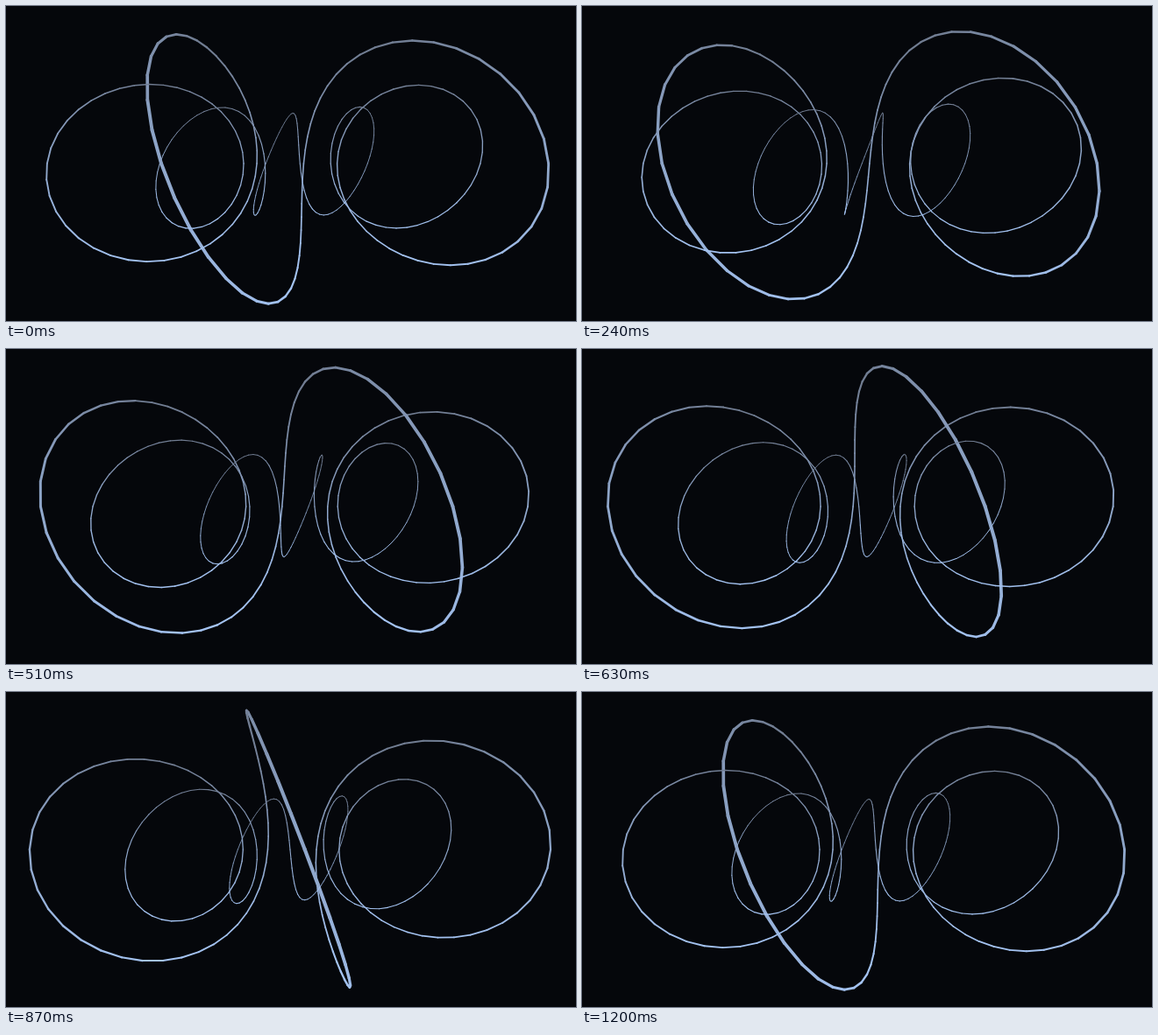
Recreate the animation shown at these times as an HTML page with a canvas. Size 650 by 360 pixels, loop 1230 ms.

```html
<!DOCTYPE html>
<html lang="en">
<head>
<meta charset="utf-8">
<title>Rotating toroidal coil</title>
<style>
  html, body { margin: 0; width: 100%; height: 100%; overflow: hidden; background: #05070b; }
  canvas { display: block; }
</style>
</head>
<body>
<canvas id="stage" width="650" height="360"></canvas>
<script>
const ctx = document.getElementById('stage').getContext('2d');
const WIDTH = 650, HEIGHT = 360;
const LOOP = 1230, STEP = 30, STEPS = 40;
const TURNS = 7, SEGMENTS = TURNS * 40;
const TUBE = 0.6;         // tube radius, relative to a ring radius of 1
const CAMERA = 2.31, FOCAL = HEIGHT / 2 / Math.tan(Math.PI / 6), LINE = 3;
const TOP = [112, 124, 145], BOTTOM = [164, 195, 241];

// Point on the coil at ring angle u, after turning the ring by spin.
function project(u, spin) {
  const ring = 1 + TUBE * Math.cos(TURNS * u);
  const height = Math.sin(TURNS * u);
  const depth = CAMERA - ring * Math.sin(u + spin);
  const scale = FOCAL / depth;
  return {
    x: WIDTH / 2 + ring * Math.cos(u + spin) * scale,
    y: HEIGHT / 2 - TUBE * height * scale,
    depth,
    height
  };
}

function shade(height) {
  const k = ((1 - height) / 2) ** 0.75;
  return `rgb(${TOP.map((c, i) => Math.round(c + (BOTTOM[i] - c) * k))})`;
}

function draw(time) {
  const step = Math.floor((time % LOOP) / STEP);
  const spin = step / STEPS * 2 * Math.PI / TURNS;
  ctx.fillStyle = '#05070b';
  ctx.fillRect(0, 0, WIDTH, HEIGHT);
  ctx.lineCap = 'round';

  let a = project(0, spin);
  for (let i = 1; i <= SEGMENTS; i++) {
    const b = project(i / SEGMENTS * 2 * Math.PI, spin);
    ctx.strokeStyle = shade((a.height + b.height) / 2);
    ctx.lineWidth = LINE * 2 / (a.depth + b.depth);
    ctx.beginPath();
    ctx.moveTo(a.x, a.y);
    ctx.lineTo(b.x, b.y);
    ctx.stroke();
    a = b;
  }
}

let start;
function tick(now) {
  start ??= now;
  draw(now - start);
  requestAnimationFrame(tick);
}
draw(0);
requestAnimationFrame(tick);
</script>
</body>
</html>
```
